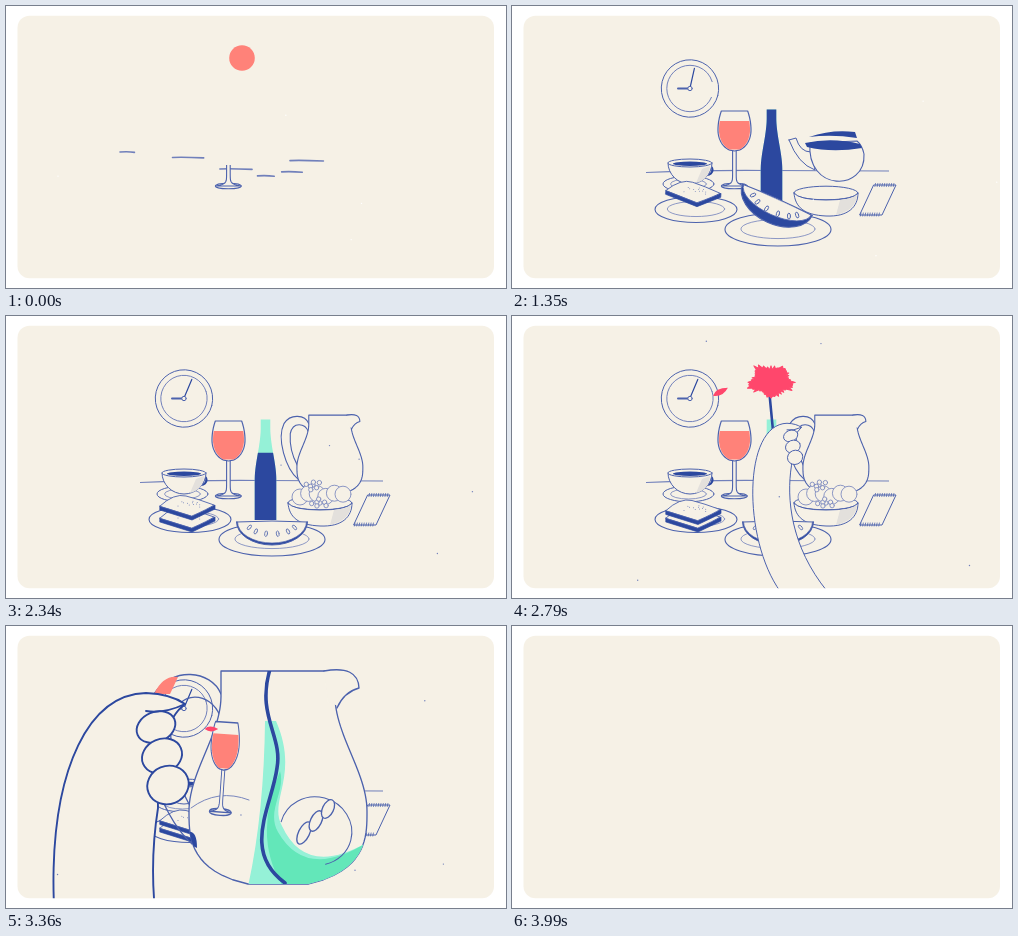
Write an HTML page with a canvas that moves like this. It is 500x282 px and loops after 4.05 s.

```html
<!DOCTYPE html>
<html lang="en">
<head>
<meta charset="utf-8">
<title>Still life</title>
<style>
html, body { margin: 0; width: 100%; height: 100%; overflow: hidden; background: #fff; }
canvas { display: block; width: 500px; height: 282px; }
</style>
</head>
<body>
<canvas id="stage"></canvas>
<script>
const LOOP = 4050, STEP = 30, TAU = Math.PI * 2;
const CREAM = '#f6f1e6', BLUE = '#2c489f', LINE = '#4c62ad', SOFT = '#7180bb', SHADE = '#e3e0dc';
const WINE = '#ff8279', PINK = '#ff476c', MINT = '#95f1d7', TEAL = '#63e7b9';

const canvas = document.getElementById('stage');
const ctx = canvas.getContext('2d');
const ratio = window.devicePixelRatio || 1;
canvas.width = 500 * ratio;
canvas.height = 282 * ratio;

const { sin, cos, sqrt, exp, abs, floor } = Math;
const clamp = v => Math.max(0, Math.min(1, v));
const smooth = v => (v = clamp(v), v * v * (3 - 2 * v));
const ease = (t, a, b) => smooth((t - a) / (b - a));
const mix = (a, b, k) => a + (b - a) * k;
const rand = n => { const v = sin(n * 127.1 + 11.7) * 43758.5453; return v - floor(v); };

// Entrance with overshoot, staggered exit, and damped swing
const pop = (t, start) => ease(t, start, start + 200) + 0.08 * sin(clamp((t - start - 100) / 220) * Math.PI);
const leave = (t, order) => 1 - ease(t, 3420 + order * 30, 3570 + order * 30);
function swing(t, start) {
  const u = clamp((t - start) / 510);
  return (1 - u) ** 2 * cos(1.9 * Math.PI * u);
}

function paint(p, fill, line, width = 1) {
  if (fill) { ctx.fillStyle = fill; ctx.fill(p); }
  if (line) { ctx.strokeStyle = line; ctx.lineWidth = width; ctx.stroke(p); }
}
const shape = (d, ...style) => paint(new Path2D(d), ...style);

function oval(x, y, rx, ry, fill, line, width, turn = 0, from = 0, to = TAU) {
  const p = new Path2D();
  p.ellipse(x, y, rx, ry, turn, from, to);
  paint(p, fill, line, width);
}

// Closed outline symmetric about x, from a half-width rule
function turned(x, top, bottom, half) {
  const p = new Path2D(), n = 50;
  for (let i = 0; i <= 2 * n + 1; i++) {
    const left = i > n, y = mix(top, bottom, (left ? 2 * n + 1 - i : i) / n);
    p.lineTo(x + (left ? -1 : 1) * half(y), y);
  }
  p.closePath();
  return p;
}

function place(x, y, o, draw) {
  const s = o.s ?? 1;
  if (s < 0.01) return;
  ctx.save();
  ctx.translate(x + (o.x || 0), y + (o.y || 0));
  ctx.rotate(o.r || 0);
  ctx.scale(s * (o.sx ?? 1), s * (o.sy ?? 1));
  ctx.translate(-x, -y);
  draw();
  ctx.restore();
}

function within(x, y, w, h, draw) {
  ctx.save();
  ctx.beginPath();
  ctx.rect(x, y, w, h);
  ctx.clip();
  draw();
  ctx.restore();
}

function table(t) {
  const k = ease(t, 0, 420);
  if (k < 1) {
    ctx.globalAlpha = 1 - k;
    for (let i = 0; i < 6; i++) {
      const x = 114 + 170 * sin(i * 0.314), y = mix(158 - 12 * cos(i), 165, k);
      shape(`M${x},${y} q9,-0.6 ${8 + 26 * abs(sin(i * 0.85 + 0.25))},0.4`, null, SOFT, 1.6);
    }
    ctx.globalAlpha = 1;
  }
  const a = 134 + 243 * ease(t, 3560, 3900), b = 134 + 243 * ease(t, 430, 1250);
  if (b > a) within(a, 150, b - a, 30, () => shape('M134,166.5 Q190,164 255,164.5 T377,165', null, SOFT, 1.1));
}

function clock(t) {
  place(178, 82.5, { s: leave(t, 8) }, () => {
    const ring = (r, a, b, line, turn) => {
      const k = ease(t, a, b);
      if (k) oval(178, 82.5, r, r, null, line, 1, 0, turn - k * TAU, turn);
    };
    ring(28.7, 500, 1000, LINE, 0.25);
    ring(23.2, 850, 1480, SOFT, -0.3);
    const h = ease(t, 950, 1250);
    if (!h) return;
    const a = 0.2 + 0.18 * ease(t, 1250, 1900);
    shape(`M178,82 l${21 * h * sin(a)},${-20 * h * cos(a)}`, null, BLUE, 1.2);
    shape(`M178,82.5 h${-12 * h}`, null, LINE, 2);
    oval(178, 82.5, 2.2, 2.2, CREAM, LINE);
  });
}

function cup(t) {
  if (t > 560 && t < 790) {
    for (let i = 0; i < 4; i++) oval(174 + i * 2.2, 154 - rand(i) * 6, 1.5, 1, BLUE);
    shape('M150,169 q10,-5 24,-5 M188,175 q11,-3 19,-11', null, BLUE, 1.2);
  }
  place(177, 180, { s: pop(t, 780) * leave(t, 6) }, () => {
    oval(176.5, 178, 25.5, 7.8, CREAM, LINE);
    oval(176.5, 178, 18, 5, null, SOFT, 0.8);
    oval(195, 164, 5.5, 5, null, BLUE, 2.2);
    oval(178, 157, 22, 21, CREAM, LINE, 1, 0, 0, Math.PI);
    shape('M184,177 Q197,174 198,160 L190,163 Z', SHADE);
    oval(178, 157, 22, 4, CREAM, LINE);
    oval(178, 157.8, 17, 2.2, BLUE);
  });
}

function plate(x, y, rx, ry) {
  oval(x, y, rx, ry, CREAM, LINE, 1.1);
  oval(x, y - 0.5, rx * 0.7, ry * 0.58, null, SOFT, 0.8);
}

function slice(y) {
  place(0, 0, { y }, () => {
    shape('M154,11 L186,21 L209,10 v4 L186,25 L154,15 Z', BLUE, BLUE, 0.7);
    shape('M154,11 Q168,-2 180,1 T208,10 Q202,14 186,21 Z', CREAM, LINE, 0.9);
    for (let i = 0; i < 12; i++) oval(170 + rand(i) * 24, 5 + rand(i + 30) * 9, 0.5, 0.5, SOFT);
  });
}

function leftPlate(t) {
  const w = swing(t, 450);
  place(184, 203.5, { y: 72 * w, r: -0.9 * w, s: ease(t, 440, 700) * leave(t, 4) }, () => {
    plate(184, 203.5, 41, 13);
    place(182, 205, { s: pop(t, 1500) }, () => slice(191));
    const drop = swing(t, 1180);
    place(182, 190, { y: 20 * drop, r: -0.4 * drop, s: ease(t, 1180, 1320) },
      () => slice(179 + 4.5 * ease(t, 2350, 2520)));
  });
}

const cupHalf = y => y > 124 ? 16.5 * sqrt(clamp(1 - ((y - 124) / 21) ** 2)) : 16.5 - 3 * ((124 - y) / 18) ** 2;
const stemHalf = y => 1.8 + 11 * exp((y - 180) / 1.7);

function glass(t) {
  const top = 160 - 60 * ease(t, -100, 1150), near = ease(t, 3080, 3360);
  const o = { s: leave(t, 7), r: 0.07 * near, x: -8 * near, y: 6 * near, sx: 1 - 0.15 * near, sy: 1 + 0.2 * near };
  place(222, 180, o, () => {
    within(200, top, 45, 190 - top, () => {
      oval(222.3, 180, 13, 2.8, CREAM, LINE, 1.1);
      paint(turned(222.4, 143, 180, stemHalf), CREAM, LINE, 1.1);
      paint(turned(222.5, 105, 145, cupHalf), CREAM, LINE, 1.2);
      const level = 143 - 28 * ease(t, 420, 900);
      if (t > 420) paint(turned(222.5, level, 143.5, y => cupHalf(y) - 1), WINE);
    });
    if (top > 107 && t > 450) {
      const lift = sin(clamp((t - 430) / 520) * Math.PI) * 10;
      shape(`M207,128 q4,${-lift * 1.5} 14,${-lift * 0.6} t17,0 v6 q-15,9 -31,0 Z`, WINE);
      oval(222, top + 2, 16, 2.3, BLUE, BLUE, 1, 0.07);
    }
  });
  if (t < 450) oval(236 - t / 32, 52 + 80 * (t / 420) ** 2, 12.8, 12.8, WINE);
}

const bottle = turned(259.5, 103.5, 204, y => 4.8 + 6 * smooth((y - 112) / 52));

function vase(t) {
  const top = 206 - 108 * ease(t, 440, 1150), drain = 98 + 110 * ease(t, 2220, 2520), s = leave(t, 0);
  if (top > 204) return;
  place(259, 204, { s }, () => {
    within(240, top, 40, 215 - top, () => paint(bottle, MINT));
    within(240, Math.max(top, drain), 40, 215, () => paint(bottle, BLUE));
    if (top > 104) oval(259.5, top + 1, 4.5 + 6 * smooth((top - 112) / 52), 2.4, '#7767b5');
  });
  flower(t, pop(t, 2360) * s);
}

function flower(t, k) {
  if (!k) return;
  const y = 110 - 45 * k;
  shape(`M257,${y + 8} Q260,105 262,${y + 60 * k}`, null, BLUE, 2.6);
  place(259, y, { s: k, r: 0.1 * swing(t, 2400) }, () => {
    const p = new Path2D(), n = 38;
    for (let i = 0; i < n * 2; i++) {
      const a = i / n * Math.PI, r = 0.8 + 0.12 * sin(a * 5) + (i % 2) * rand(i) * 0.25;
      p.lineTo(259 + cos(a) * 24 * r, y + sin(a) * 16.5 * r);
    }
    p.closePath();
    paint(p, PINK, PINK);
  });
}

function petal(t) {
  if (t < 2580) return;
  const far = ease(t, 2580, 2790), fall = ease(t, 2790, 3360), out = ease(t, 3360, 3600);
  const x = 246 - 38 * far - 3 * fall, y = 66 + 10 * far + 27 * fall + 40 * out;
  place(x, y, { r: -0.5 * (1 - fall), s: 1 - 0.2 * fall - 0.8 * out },
    () => shape(`M${x - 8},${y} q6,-6 17,0 q-9,6 -17,0 Z`, PINK));
}

function middlePlate(t) {
  const w = swing(t, 460);
  place(266, 224, { y: 50 * w, r: -0.55 * w, s: ease(t, 380, 840) * leave(t, 3) }, () => plate(266, 223.5, 53, 16.5));
}

function melon(t) {
  const w = swing(t, 1110), rind = 2 + 6 * (1 - ease(t, 1350, 1650));
  place(266, 206, { y: 46 * w, x: 2 * w, r: -1.6 * w, s: pop(t, 1110) * leave(t, 2) }, () => {
    oval(266, 206, 35.5, 23, BLUE, LINE, 1, 0, 0, Math.PI);
    oval(266, 206, 34.5, 23 - rind, CREAM, LINE, 0.7, 0, 0, Math.PI);
    shape('M230.5,206 Q266,204 301.5,206', CREAM, LINE);
    for (let i = 0; i < 6; i++) {
      const a = 0.35 + i * 0.49;
      oval(266 + cos(a) * 24, 208 + sin(a) * 10, 1.4, 2.8, CREAM, LINE, 0.8, (1.57 - a) * -0.6);
    }
  });
}

function bowl(t) {
  const w = swing(t, 440);
  place(314, 187, { y: 65 * w, r: -0.75 * w, s: ease(t, 380, 840) * leave(t, 1) }, () => {
    oval(314, 187, 32, 6.8, CREAM, LINE);
    for (let i = 0; i < 6; i++) {
      const k = pop(t, 1400 + i * 50);
      if (k) oval(294 + i * 8.6, 181 - 4 * abs(sin(i * 1.1)), 8 * k, 8 * k, CREAM, SOFT, 0.8);
    }
    const k = pop(t, 1620);
    // Two sunflower-spiral clusters of berries
    if (k) for (let i = 0; i < 14; i++) {
      const r = 2 * sqrt(floor(i / 2)), a = i * 1.2;
      oval(307 + (i % 2) * 7 + r * 1.7 * cos(a), 169 + (i % 2) * 18 + r * sin(a), 2.2 * k, 2.2 * k, CREAM, SOFT, 0.8);
    }
    shape('M282,187 C283,201 292,209 314,210 S346,201 346,187 Q341,194 314,194 T282,187 Z', CREAM, LINE);
    shape('M328,194 Q340,193 345,189 Q344,204 324,209 Z', SHADE);
  });
}

function pad(t) {
  const drawn = t > 800;
  place(366, 194, { s: ease(t, 520, 660) * leave(t, 5) }, () => {
    shape('M362,179 h22 l-14,30 h-22 Z', drawn ? CREAM : null, drawn ? LINE : null);
    if (!drawn) shape('M384,180 L371,208 h-22', null, LINE);
    for (let i = 0; i < 9; i++) for (const side of [0, 1])
      shape(`M${363.5 - 14.5 * side + i * 2.3},${177.5 + 29.5 * side} l-0.6,3`, null, LINE, 0.8);
  });
}

function teapot(t) {
  if (t > 1590) return;
  place(324, 173, { s: pop(t, 1020), sy: 1 + 0.35 * ease(t, 1500, 1590) }, () => {
    shape('M277,134 l7,-2 Q288,146 299,146 l4,18 Q286,158 277,134 Z', CREAM, LINE);
    shape('M298,137 C294,186 354,186 352,148 Q350,139 345,135 Z', CREAM, LINE, 1.1);
    shape('M293,137 Q320,131 348,138 l2,4 Q320,147 295,141 Z', BLUE);
    shape('M297,131 Q320,123 343,126 l2,6 Q320,128 297,131 Z', BLUE);
  });
}

// Jug and arm share close-up coordinates
const jugHalf = y => y < 185 ? 57 + 32 * smooth((y - 70) / 115) : 89 * (1 - clamp((y - 185) / 76) ** 3) ** 0.5;
const jugBody = turned(272, 45, 258, jugHalf);

function zoomed(t, draw) {
  const k = ease(t, 2850, 3330), out = ease(t, 3480, 3930), s = mix(1, 2.7, k) / 2.7;
  ctx.save();
  ctx.translate(mix(325, 275, k) - 145 * out, mix(138, 150, k) + 390 * out);
  ctx.rotate(-0.35 * out);
  ctx.scale(s, s);
  ctx.translate(-275, -150);
  draw(mix(1, 1.9, k) / s, k);
  ctx.restore();
}

function jug(t) {
  if (t < 1590) return;
  zoomed(t, (w, k) => place(275, 255, { sy: 0.65 + 0.35 * pop(t, 1590) }, () => {
    const thin = w * mix(1.1, 0.7, k);
    shape('M215,68 C205,44 166,40 148,68 C128,108 152,188 186,218', null, LINE, thin);
    shape('M214,90 C205,66 172,62 165,95 Q162,140 184,180', null, LINE, thin);
    if (k > 0.1) shape('M148,68 Q157,49 172,51 l-8,17 Z', WINE);
    paint(jugBody, CREAM, LINE, thin);
    shape('M318,45 Q352,39 353,62 Q338,66 332,80 L322,76 Z', CREAM);
    shape('M318,45 Q352,39 353,62 Q338,66 331,82', null, LINE, thin);
    if (k > 0) filling(t, k, w);
  }));
}

function filling(t, k, w) {
  const sway = sin((t - 3360) / 110) * 4;
  ctx.save();
  ctx.clip(jugBody);
  ctx.globalAlpha = k;
  shape(`M259,${95 + sway} h11 C294,150 262,175 276,200 Q300,252 362,216 L345,265 H241 Q258,190 259,95 Z`, MINT);
  shape('M274,145 C280,165 260,185 272,206 Q300,255 362,216 L340,265 H280 Q245,215 274,145 Z', TEAL);
  shape('M264,43 C250,90 277,110 271,142 C266,180 235,225 279,257', null, BLUE, w * 1.9);
  oval(310, 205, 36, 34, null, LINE, w * 0.55, 0.3, 3.1, 7.3);
  for (let i = 0; i < 3; i++) oval(298 + i * 12, 207 - i * 12, 5.5, 12 - i, CREAM, LINE, w * 0.7, 0.45);
  shape('M185,182 Q212,162 243,174', null, SOFT, w * 0.5);
  shape('M177,208 q14,-8 14,14 q-10,-4 -14,-14', BLUE);
  ctx.restore();
}

function arm(t) {
  if (t < 2480) return;
  const rise = 1 - ease(t, 2480, 2740);
  zoomed(t, (w, k) => {
    const line = k > 0.5 ? BLUE : LINE;
    ctx.translate(90 * rise, 490 * rise);
    shape('M121,520 C20,380 20,70 140,67 Q165,68 179,78 Q150,100 152,182 C138,270 150,400 248,520 Z', CREAM, line, w);
    for (let i = 0; i < 3; i++) oval(150 + i * 6, 101 + i * 29, 20 + i * 0.5, 15 + i * 2, CREAM, line, w, -0.4);
    shape('M140,85 Q158,88 179,78', null, line, w);
  });
}

function specks(t) {
  if (t > 3930) return;
  for (let i = 0; i < 5; i++)
    oval(12 + rand(t + i) * 486, 4 + rand(t + i + 50) * 274, 0.7, 0.7, t > 2250 ? SOFT : '#fff');
}

function splash(t) {
  const k = (t - 520) / 330;
  if (k < 0 || k > 1) return;
  for (let i = 0; i < 5; i++) oval(184 + (i - 2) * 20 * k, 186 + 45 * k * k * (1 + rand(i) / 2), 0.9, 0.9, BLUE);
}

function render(t) {
  ctx.setTransform(ratio, 0, 0, ratio, 0, 0);
  ctx.fillStyle = '#fff';
  ctx.fillRect(0, 0, 500, 282);
  ctx.lineCap = ctx.lineJoin = 'round';
  ctx.save();
  ctx.beginPath();
  ctx.roundRect(11.5, 9.7, 476.5, 262.5, 12);
  ctx.fillStyle = CREAM;
  ctx.fill();
  ctx.clip();
  if (t < 3980) {
    const still = [table, clock, cup, leftPlate, splash];
    const front = [vase, middlePlate, bowl, melon, pad];
    const order = t < 2880
      ? [...still, glass, teapot, jug, ...front, petal, arm]
      : [...still, ...front, jug, glass, petal, arm];
    for (const draw of order) draw(t);
  }
  ctx.restore();
  specks(t);
}

const start = performance.now();
function tick() {
  const t = (performance.now() - start) % LOOP;
  render(Math.min(3990, floor(t / STEP) * STEP));
  requestAnimationFrame(tick);
}
tick();
</script>
</body>
</html>
```
